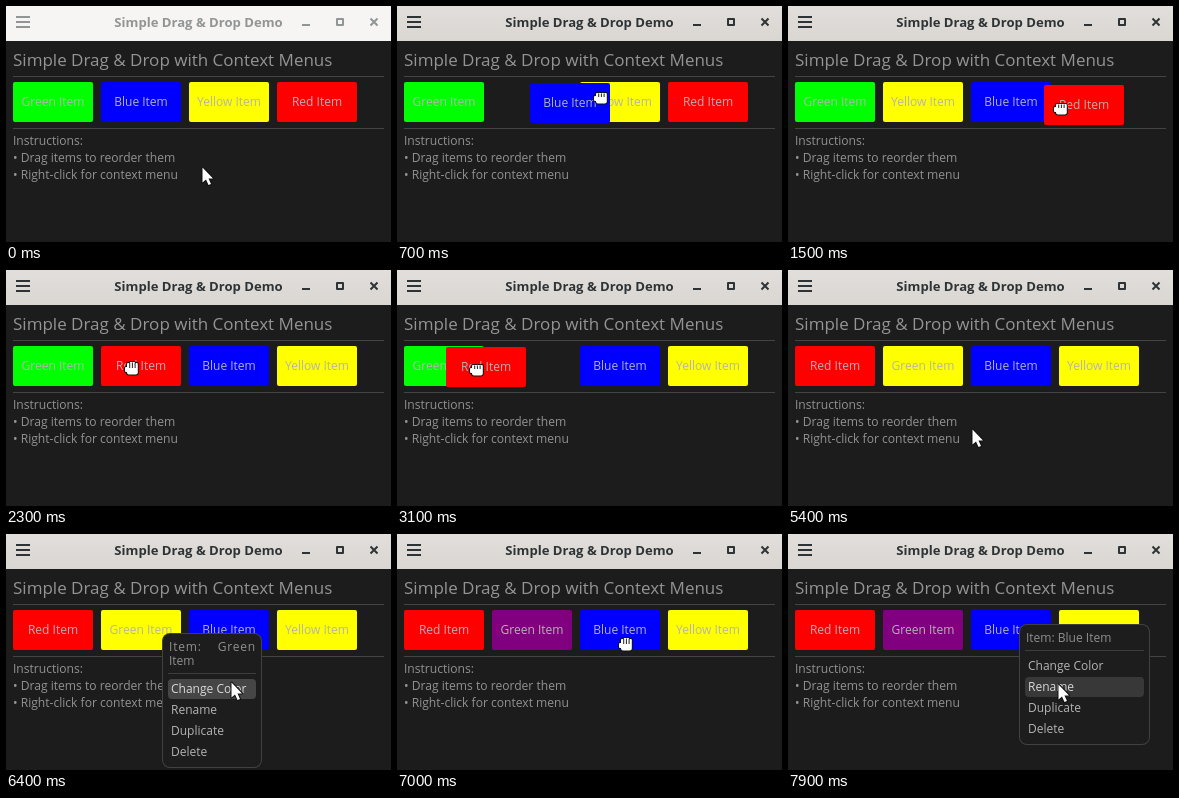
Recreate the animation shown at these times as an HTML page with a canvas. Size 385x236 px, loop 8 s.

```html
<!DOCTYPE html>
<html lang="en">
<head>
<meta charset="utf-8">
<title>Simple Drag &amp; Drop Demo</title>
<style>
html, body { margin: 0; width: 100%; height: 100%; overflow: hidden; background: #1c1c1c; }
canvas { display: block; }
</style>
</head>
<body>
<canvas id="stage" width="385" height="236"></canvas>
<script>
const ctx = document.getElementById('stage').getContext('2d');
const FONT = '"Open Sans", "Noto Sans", sans-serif';
const LOOP = 8000, STEP = 100, MENU_LIFE = 800;
const ITEM_W = 80, ITEM_H = 40, ITEM_Y = 76, PITCH = 88, LEFT = 7;
const ROW_H = 20, ROW_PITCH = 21;
const actions = ['Change Color', 'Rename', 'Duplicate', 'Delete'];
const slotX = i => LEFT + i * PITCH;

// The pointer glides from point to point, resting after each glide.
// A glide may drag an item between slots or end by opening a menu.
const home = { x: 196, y: 161 };
const glides = [];
function glide(dur, x, y, opts = {}) {
  const prev = glides.at(-1);
  const start = prev ? prev.end + prev.rest : 0;
  glides.push({ from: prev || home, x, y, start, end: start + dur, rest: STEP, pow: 1, bend: 0, ...opts });
}

glide(400, 165, 89);
glide(300, 222, 90, { drag: [1, 2], rest: 200 });
glide(300, 287, 98, { rest: 0 });
glide(700, 102, 92, { drag: [3, 1], rest: 0, pow: 2, bend: 4.5 });
glide(300, 125, 97);
glide(800, 72, 98, { drag: [1, 0] });
glide(800, 145, 108, { bend: -7, menu: { name: 'Green Item', wrap: true, paint: '#ffff00' } });
glide(300, 220, 174, { rest: 300 });
glide(600, 184, 159, { rest: 0 });
glide(300, 155, 99, { menu: { name: 'Green Item', wrap: true, paint: '#800080' } });
glide(200, 251, 150);
glide(300, 225, 148, { rest: 400 });
glide(300, 230, 90, { menu: { name: 'Blue Item' } });
glide(200, 254, 142);
glide(400, 270, 150);

const drags = glides.filter(g => g.drag);
const menus = glides.filter(g => g.menu).map(g => ({
  ...g.menu, x: g.x + 1, y: g.y, w: g.menu.wrap ? 100 : 131, top: g.menu.wrap ? 46 : 32,
  open: g.end + STEP, close: g.end + STEP + MENU_LIFE
}));

function pointerAt(t) {
  const g = glides.findLast(g => g.start <= t);
  const u = Math.min(1, (t - g.start) / (g.end - g.start)), k = u ** g.pow;
  return {
    x: Math.round(g.from.x + (g.x - g.from.x) * k),
    y: Math.round(g.from.y + (g.y - g.from.y) * k + g.bend * Math.sin(Math.PI * u))
  };
}

function rect(x, y, w, h, color) {
  ctx.fillStyle = color;
  ctx.fillRect(x, y, w, h);
}

function roundRect(x, y, w, h, r, color) {
  ctx.beginPath();
  ctx.roundRect(x, y, w, h, r);
  ctx.fillStyle = color;
  ctx.fill();
}

function text(s, x, y, size, color, align = 'left', weight = 400) {
  ctx.font = `${weight} ${size}px ${FONT}`;
  ctx.textAlign = align;
  ctx.fillStyle = color;
  ctx.fillText(s, x, y);
}

function outlined(line) {
  ctx.lineJoin = 'round';
  ctx.strokeStyle = '#111';
  ctx.lineWidth = line;
  ctx.stroke();
  ctx.fillStyle = '#fff';
  ctx.fill();
}

function header(active) {
  const ink = active ? '#2e3436' : '#929595';
  const g = ctx.createLinearGradient(0, 0, 0, 35);
  g.addColorStop(0, active ? '#e1dedb' : '#f6f5f4');
  g.addColorStop(1, active ? '#dad6d2' : '#f6f5f4');
  rect(0, 0, 385, 35, g);
  text('Simple Drag & Drop Demo', 192.5, 21, 13.1, ink, 'center', 700);
  for (let i = 0; i < 3; i++) rect(10, 10 + i * 5, 14, 2, ink);
  rect(296, 18, 8, 2, ink);
  ctx.strokeStyle = ink;
  ctx.lineWidth = 2;
  ctx.strokeRect(331, 13, 6, 6);
  ctx.beginPath();
  for (const s of [-1, 1]) {
    ctx.moveTo(368 - 3.5, 16 - 3.5 * s);
    ctx.lineTo(368 + 3.5, 16 + 3.5 * s);
  }
  ctx.stroke();
}

function page() {
  text('Simple Drag & Drop with Context Menus', LEFT, 60, 17, '#949494');
  for (const y of [70, 122]) rect(LEFT, y, 371, 1, '#444');
  ['Instructions:', '• Drag items to reorder them', '• Right-click for context menu']
    .forEach((s, i) => text(s, LEFT, 139 + i * 17, 12.1, '#929292'));
}

function drawItem(item, x, y) {
  roundRect(x, y, ITEM_W, ITEM_H, 2, item.color);
  text(item.name, x + ITEM_W / 2, y + 24, 12, '#b4b4b4', 'center');
}

function items(t, p, drag) {
  const paint = menus.findLast(m => m.paint && t >= m.close)?.paint;
  const list = [
    { name: 'Green Item', color: paint || '#00ff00' },
    { name: 'Blue Item', color: '#0000ff' },
    { name: 'Yellow Item', color: '#ffff00' },
    { name: 'Red Item', color: '#ff0000' }
  ];
  for (const { end, drag: [a, b] } of drags) {
    if (t > end) [list[a], list[b]] = [list[b], list[a]];
  }
  const held = drag ? drag.drag[0] : -1;
  list.forEach((item, i) => {
    if (i !== held) drawItem(item, slotX(i), ITEM_Y);
  });
  if (drag) drawItem(list[held], slotX(held) + p.x - drag.from.x, ITEM_Y + p.y - drag.from.y);
}

function drawMenu(m, p) {
  const { x, y, w, top } = m, h = top + 89, dim = '#909090';
  roundRect(x, y, w, h, 8, '#414141');
  roundRect(x + 1, y + 1, w - 2, h - 2, 7, '#1d1d1d');
  if (m.wrap) {
    const [first, second] = m.name.split(' ');
    ctx.letterSpacing = '0.8px';
    text('Item:', x + 7, y + 18, 12, dim);
    text(first, x + w - 6, y + 18, 12, dim, 'right');
    ctx.letterSpacing = '0px';
    text(second, x + 7, y + 32, 12, dim);
  } else {
    text('Item: ' + m.name, x + 7, y + 18, 12, dim);
  }
  rect(x + 6, y + top - 6, w - 12, 1, '#3d3d3d');
  actions.forEach((s, i) => {
    const rx = x + 6, ry = y + top + i * ROW_PITCH, rw = w - 12;
    const on = p.x >= rx && p.x < rx + rw && p.y >= ry && p.y < ry + ROW_H;
    if (on) roundRect(rx, ry, rw, ROW_H, 4, m.wrap ? '#464646' : '#383838');
    text(s, rx + 3, ry + 14, 12, on ? '#d8d8d8' : '#b4b4b4');
  });
}

function arrow(x, y) {
  ctx.beginPath();
  [[0, 0], [0, 15], [3.5, 12], [6, 17.5], [8.5, 16.5], [6, 11], [10.5, 11]]
    .forEach(([dx, dy]) => ctx.lineTo(x + dx + 0.5, y + dy + 0.5));
  ctx.closePath();
  outlined(2);
}

function hand(x, y, closed) {
  const left = x - 6, top = y - 6 + (closed ? 2 : 0), palm = y + 1;
  ctx.beginPath();
  for (let i = 0; i < 4; i++) {
    const dip = closed ? 0 : Math.abs(i - 1.5) - 0.5;
    ctx.roundRect(left + 2 + i * 2.7, top + 1 + dip, 2.7, 8, 1);
  }
  ctx.roundRect(left, palm - 1, 4, 5, 1);
  ctx.roundRect(left + 2, palm - 1, 10.8, 7.5, [0, 0, 2, 2]);
  outlined(2);
  for (let i = 1; i < 4; i++) rect(left + 1.5 + i * 2.7, top + 2, 1, palm - top - 2, '#222');
}

function draw(t) {
  const p = pointerAt(t);
  const drag = drags.find(g => t > g.start && t <= g.end);
  const menu = menus.find(m => t >= m.open && t < m.close);
  rect(0, 0, 385, 236, '#1c1c1c');
  header(t > drags[0].start);
  page();
  items(t, p, drag);
  if (menu) drawMenu(menu, p);
  const over = p.y >= ITEM_Y && p.y < ITEM_Y + ITEM_H && (p.x - LEFT) % PITCH < ITEM_W;
  if (drag || (over && !menu)) hand(p.x, p.y, !!drag);
  else arrow(p.x, p.y);
}

const begin = performance.now();
function tick() {
  const t = (performance.now() - begin) % LOOP;
  draw(Math.floor(t / STEP) * STEP);
  requestAnimationFrame(tick);
}
tick();
</script>
</body>
</html>
```
